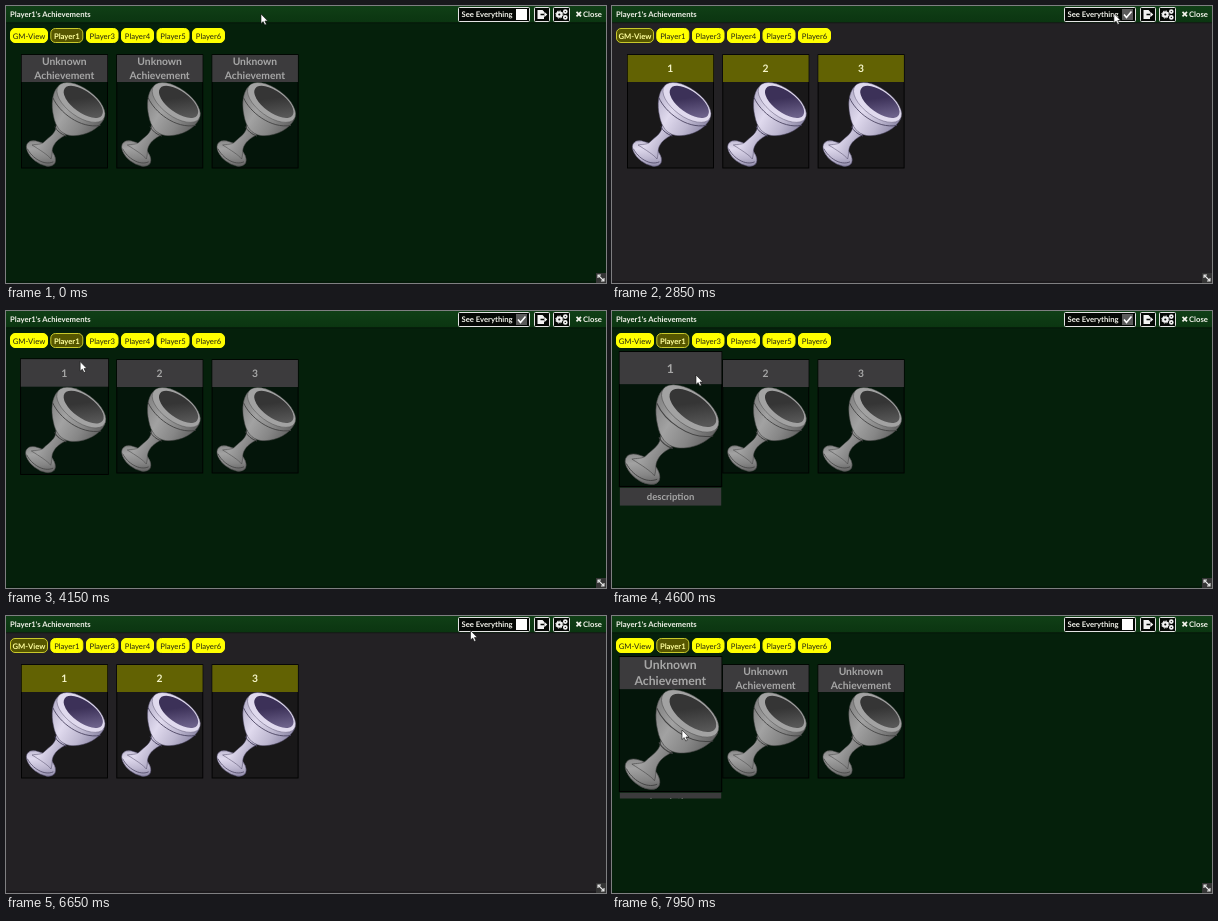
Animation, 600 px wide and 277 px high, one loop 8000 ms. Source, as an HTML page:

```html
<!DOCTYPE html>
<html lang="en">
<head>
<meta charset="utf-8">
<title>Achievements</title>
<style>
  html, body { margin: 0; width: 100%; height: 100%; overflow: hidden; background: #05200b; }
  #stage {
    display: block; width: 100vw; height: 100vh;
    font-family: Lato, "Open Sans", sans-serif; font-size: 7.7px; text-rendering: geometricPrecision;
    --bg: #05200b; --panel: #04150a; --bar: #3c3b3d; --ink: #a6a6a6;
    --lit: #a2a2a2; --mid: #868686; --dim: #5c5c5c; --line: #434343; --in1: #353535; --in2: #575757;
  }
  #stage.gm {
    --bg: #232124; --panel: #191819; --bar: #626203; --ink: #f4f4c8;
    --lit: #e0daee; --mid: #bdb7d0; --dim: #8580a0; --line: #4c4663; --in1: #3c3158; --in2: #6c618a;
  }
  text { text-anchor: middle; }
  .bold { font-weight: 700; }
  .start { text-anchor: start; }
  .light { fill: #f2f2ea; }
  .box { fill: #050805; stroke: #e4e4e4; }
  .tab rect { fill: #ff0; stroke: #ff0; }
  .tab text { fill: #242410; }
  .tab.on rect { fill: #565600; stroke: #c9c92a; }
  .tab.on text { fill: #ffff9c; font-weight: 700; }
  .title { fill: var(--ink); font-weight: 700; font-size: 10.3px; }
  .s1 { stop-color: var(--lit); } .s2 { stop-color: var(--mid); } .s3 { stop-color: var(--dim); }
  .i1 { stop-color: var(--in1); } .i2 { stop-color: var(--in2); }
</style>
</head>
<body>
<svg id="stage" viewBox="0 0 600 277" preserveAspectRatio="none">
  <defs>
    <linearGradient id="header" x2="0" y2="1">
      <stop stop-color="#103f16"/><stop offset="1" stop-color="#0b3511"/>
    </linearGradient>
    <linearGradient id="metal" x1="0" y1=".25" x2="1" y2=".8">
      <stop class="s2"/><stop offset=".3" class="s1"/><stop offset=".65" class="s2"/><stop offset="1" class="s3"/>
    </linearGradient>
    <linearGradient id="hollow" x1="0" y1="0" x2="1" y2=".5">
      <stop class="i1"/><stop offset=".5" class="i1"/><stop offset="1" class="i2"/>
    </linearGradient>
    <g id="goblet" stroke-linecap="round">
      <g fill="url(#metal)" stroke="var(--line)" stroke-width=".5">
        <ellipse rx="17" ry="9.500" transform="translate(35 147.500) rotate(38)"/>
        <path d="M50 119C51 127 43 131 38 136C35 139 30 138 26 139C34 144 42 149 45 153C47 147 45 144 48 139C50 135 54 132 60 129Z"/>
        <path d="M51.500 81C46 87 45 99 47.500 110C49.500 121 55 128 64 129.500C79 131 93 123 98 113Z"/>
      </g>
      <g fill="none" stroke="var(--line)">
        <path d="M21.500 143C26 152 38 160 47 156" stroke-width=".8"/>
        <path d="M49 121Q52 127 60 130" stroke-width="1"/>
        <path d="M47 92C53 106 74 123 94 119.500" stroke-width=".9"/>
      </g>
      <g transform="translate(75 96.500) rotate(36)">
        <ellipse rx="28" ry="14" fill="var(--lit)" stroke="var(--line)" stroke-width=".4"/>
        <ellipse cx="1.500" cy="-1.800" rx="23" ry="10.700" fill="url(#hollow)"/>
      </g>
    </g>
  </defs>

  <rect width="600" height="277" fill="var(--bg)"/>
  <rect width="600" height="16.500" fill="url(#header)"/>
  <path d="M0 16.800H600M0 276H600" stroke="#000" stroke-opacity=".4"/>
  <text class="bold start light" x="4" y="10.800">Player1's Achievements</text>

  <rect class="box" x="452.500" y="1.500" width="71" height="14" rx="1"/>
  <text class="bold start light" x="455.500" y="11">See Everything</text>
  <rect id="check" x="510" y="3" width="11" height="11"/>
  <path id="tick" d="M512 8.500L514.500 11.500L519.500 5.500" fill="none" stroke="#fff" stroke-width="1.600"/>

  <rect class="box" x="528.500" y="1.500" width="15" height="14" rx="1"/>
  <path d="M531.500 4H536.500L538 5.500V7.800H534.500V9.200H538V13H531.500ZM538.300 7.800V5.800L541.300 8.500L538.300 11.200V9.200Z" fill="#f2f2f2"/>
  <rect class="box" x="547.500" y="1.500" width="16" height="14" rx="1"/>
  <g fill="none" stroke="#f2f2f2">
    <circle cx="553.300" cy="8.500" r="2.200" stroke-width="2.200"/>
    <circle cx="553.300" cy="8.500" r="3.600" stroke-width="1" stroke-dasharray="1.410"/>
    <circle cx="559.300" cy="5.600" r="1.500" stroke-width="1.700"/>
    <circle cx="559.300" cy="11.400" r="1.500" stroke-width="1.700"/>
  </g>
  <path d="M570.500 5.800L575 10.300M575 5.800L570.500 10.300" stroke="#f2f2ea" stroke-width="1.700"/>
  <text class="bold start light" x="577" y="10.800">Close</text>

  <g id="tabs"></g>
  <g id="cards"></g>

  <rect x="590" y="267" width="10" height="10" fill="#353535"/>
  <path d="M592.500 269.500L597.500 274.500M592 272V269H595M598 272V275H595" fill="none" stroke="#e8e8e8" stroke-width="1.100"/>

  <path id="arrow" d="M0 0V9.500L2.200 7.600L3.800 11L5.400 10.200L3.900 7H6.800Z" fill="#fff" stroke="#111" stroke-width=".6"/>
  <path id="move" d="M0-6L2.500-3H.8V-.8H3V-2.500L6 0L3 2.500V.8H.8V3H2.500L0 6L-2.500 3H-.8V.8H-3V2.500L-6 0L-3-2.500V-.8H-.8V-3H-2.500Z" fill="#fff" stroke="#111" stroke-width=".7"/>
</svg>
<script>
const LOOP = 8000, STEP = 50, POP = 0.19;
const $ = id => document.getElementById(id);
const stage = $('stage');

function add(parent, tag, attrs = {}, text = '') {
  const node = document.createElementNS('http://www.w3.org/2000/svg', tag);
  for (const key in attrs) node.setAttribute(key, attrs[key]);
  node.textContent = text;
  return parent.appendChild(node);
}

// Interpolates rows of [time, ...values], holding the ends.
function track(rows, t, ease = u => u) {
  const next = rows.findIndex(row => row[0] > t);
  if (next === 0) return rows[0].slice(1);
  if (next < 0) return rows[rows.length - 1].slice(1);
  const a = rows[next - 1], b = rows[next];
  const u = ease((t - a[0]) / (b[0] - a[0]));
  return a.slice(1).map((v, i) => v + (b[i + 1] - v) * u);
}
const smooth = u => u * u * (3 - 2 * u);
const within = (t, ...spans) => spans.some(([from, to]) => t >= from && t < to);

const pointer = [
  [0, 255, 8], [250, 262, 12], [900, 430, 70], [1400, 472, 92], [1600, 472, 92], [1750, 474, 79],
  [2200, 514, 7], [2750, 514, 7], [3600, 198, 19], [3850, 62, 28], [3980, 62, 28],
  [4200, 76, 54], [4600, 84, 64], [5150, 84, 75], [5400, 106, 130], [5600, 250, 158],
  [5750, 325, 153], [5980, 481, 48], [6200, 514, 7], [6480, 514, 7], [6650, 464.5, 14.5],
  [7130, 62, 27], [7280, 62, 28], [7620, 67, 60], [7900, 70, 114]
];

const motion = [
  { pop: [[4120, 0], [4400, 1], [5380, 1], [5830, 0], [7600, 0], [7850, 1]],
    open: [[4300, 0], [4600, 1], [5380, 1], [5600, 0], [7850, 0], [8150, 1]],
    fade: [[0, 1]], lift: 0 },
  { pop: [[5420, 0], [5520, 0.25], [5640, 0]], open: [[0, 0]], fade: [[0, 0]], lift: 0 },
  { pop: [[5520, 0], [5660, 0.5], [5860, 0]], open: [[0, 1]],
    fade: [[5600, 0], [5680, 0.4], [5750, 0.35], [5850, 0]], lift: 8 }
];

const tabs = [['GM-View', 4, 38], ['Player1', 44.3, 33], ['Player3', 80, 32.5],
  ['Player4', 115, 33], ['Player5', 150.5, 33], ['Player6', 186, 33]].map(([label, x, w]) => {
  const g = add($('tabs'), 'g', { class: 'tab' });
  add(g, 'rect', { x: x + 0.5, y: 22.5, width: w - 1, height: 14, rx: 4.5 });
  add(g, 'text', { x: x + w / 2, y: 32.6 }, label);
  return g;
});

const cards = motion.map((moves, i) => {
  const outer = add($('cards'), 'g', { transform: `translate(${i * 95.3} 0)` });
  const g = add(outer, 'g');
  add(g, 'rect', { x: 15.5, y: 48.7, width: 86, height: 113.3, fill: 'var(--panel)', stroke: '#000', 'stroke-width': 0.9 });
  add(g, 'rect', { x: 15.7, y: 49, width: 85.6, height: 27, fill: 'var(--bar)' });
  add(g, 'use', { href: '#goblet' });
  const number = add(g, 'text', { class: 'title', x: 58.3, y: 66.3 }, i + 1);
  const unknown = add(g, 'g');
  ['Unknown', 'Achievement'].forEach((word, n) =>
    add(unknown, 'text', { class: 'title', x: 58.3, y: 59.2 + n * 13.7 }, word));
  const note = add(g, 'svg', { x: 15.7, y: 162.8 - moves.lift, width: 85.6, height: 0, overflow: 'hidden' });
  add(note, 'rect', { width: 85.6, height: 15.4, fill: 'var(--bar)' });
  add(note, 'text', { class: 'title', x: 42.8, y: 10.3, style: 'font-size:8px' }, 'description');
  return { ...moves, g, number, unknown, note };
});

const show = (node, on) => node.setAttribute('visibility', on ? 'visible' : 'hidden');

function render(t) {
  const gm = within(t, [2600, 3950], [6550, 7250]);
  const named = within(t, [2600, 7250]);
  const checked = within(t, [2300, 6300]);
  const moving = within(t, [3450, 3700]);

  stage.classList.toggle('gm', gm);
  tabs.forEach((tab, i) => tab.classList.toggle('on', i === (gm ? 0 : 1)));
  $('check').setAttribute('fill', checked ? '#5b5b5b' : '#fff');
  show($('tick'), checked);

  for (const card of cards) {
    const scale = 1 + POP * track(card.pop, t)[0];
    card.g.setAttribute('transform', `translate(58.3 91) scale(${scale}) translate(-58.3 -91)`);
    card.note.setAttribute('height', 15.4 * track(card.open, t)[0]);
    card.note.setAttribute('opacity', track(card.fade, t)[0]);
    show(card.number, named);
    show(card.unknown, !named);
  }

  const at = `translate(${track(pointer, t, smooth).join(' ')})`;
  for (const id of ['arrow', 'move']) {
    $(id).setAttribute('transform', at);
    show($(id), (id === 'move') === moving);
  }
}

const start = performance.now();
function tick() {
  const t = (performance.now() - start) % LOOP;
  render(Math.floor(t / STEP) * STEP);
  requestAnimationFrame(tick);
}
tick();
</script>
</body>
</html>
```
